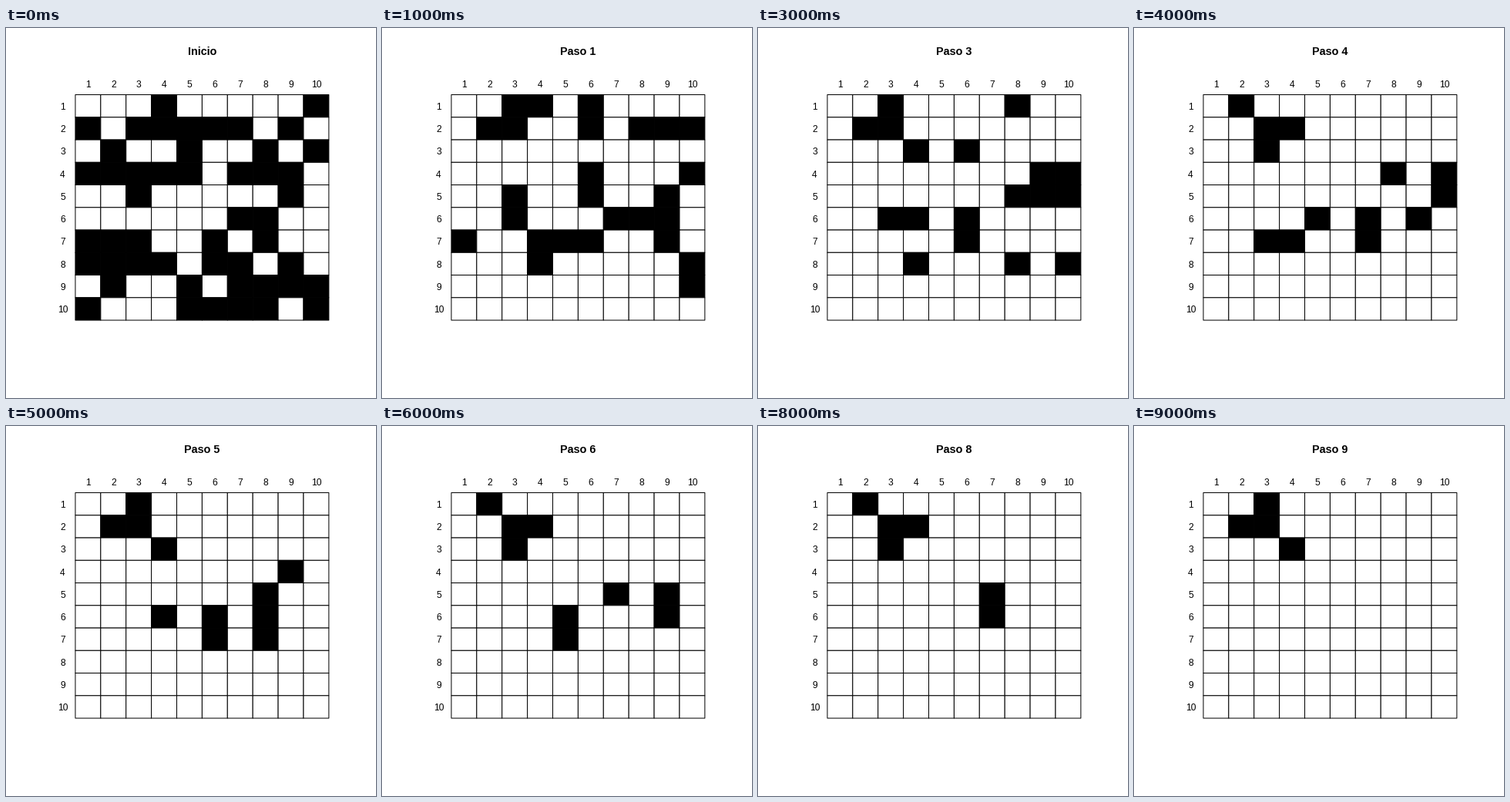
Recreate the animation shown at these times as a matplotlib script. Size 480 by 480 pixels, loop 10 s.

```python
import math

import matplotlib.pyplot as plt
import numpy as np
from matplotlib.animation import FuncAnimation
from matplotlib.patches import Rectangle

SIZE, DPI, N, STEPS = 480, 96, 10, 10
PX = 72 / DPI  # points per pixel

# plot region inside the margins, with 4% padding around the range 0..11
X0, X1, Y0, Y1 = 59.04, 449.76, 59.04, 406.56
CELL_W = (X1 - X0) / 11.88
CELL_H = (Y1 - Y0) / 11.88

START = """
...#.....#
#.#####.#.
.#..#..#.#
#####.###.
..#.....#.
......##..
###..#.#..
####.##.#.
.#..#.####
#...####.#
"""


def px(x):
    return X0 + (x + 0.44) * CELL_W


def py(y):
    return Y0 + (y + 0.44) * CELL_H


def evolve(grid):
    """A cell is alive next if exactly three of its neighbours are alive."""
    p = np.pad(grid, 1)
    count = sum(p[i:i + N, j:j + N] for i in range(3) for j in range(3)) - grid
    return (count == 3).astype(int)


grids = [np.array([[int(c == "#") for c in row] for row in START.split()])]
while len(grids) < STEPS:
    grids.append(evolve(grids[-1]))

plt.rcParams["font.family"] = "Liberation Sans"
fig = plt.figure(figsize=(SIZE / DPI, SIZE / DPI), dpi=DPI, facecolor="white")
ax = fig.add_axes([0, 0, 1, 1])
ax.set_xlim(0, SIZE)
ax.set_ylim(SIZE, 0)
ax.axis("off")


def label(x, cy, text, size, weight="normal"):
    baseline = math.ceil(cy + 0.344 * size)
    return ax.text(x, baseline, text, fontsize=size * PX, weight=weight,
                   color="black", ha="center", va="baseline")


title = label((X0 + X1) / 2, Y0 / 2, "Inicio", 14.4, "bold")
for k in range(1, N + 1):
    label(px(k), py(0), str(k), 12)
    label(px(0), py(k), str(k), 12)

cells = []
for r in range(N):
    for c in range(N):
        cell = Rectangle((px(c + 0.5), py(r + 0.5)), CELL_W, CELL_H,
                         edgecolor="black", facecolor="white",
                         linewidth=PX, joinstyle="round", snap=False)
        cells.append(ax.add_patch(cell))


def draw(step):
    title.set_text(f"Paso {step}" if step else "Inicio")
    for cell, alive in zip(cells, grids[step].flat):
        cell.set_facecolor("black" if alive else "white")
    return [title, *cells]


anim = FuncAnimation(fig, draw, frames=STEPS, interval=1000,
                     repeat=True, repeat_delay=0, blit=False)
plt.show()
```
